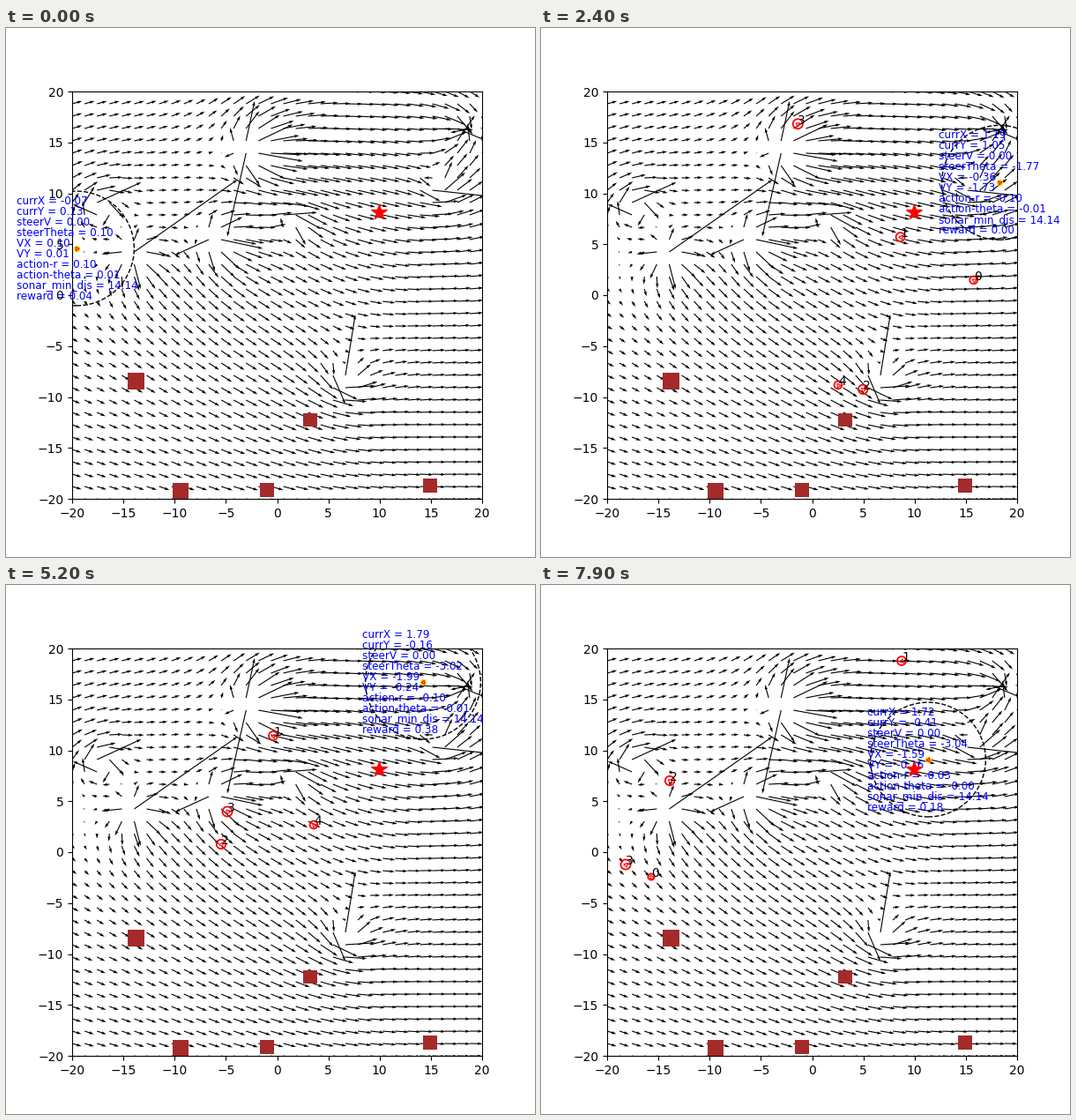
Recreate the animation shown at these times as a matplotlib script. Size 600 px wide and 600 px high, loop 8 s.

```python
import numpy as np
import matplotlib.pyplot as plt
from matplotlib.animation import FuncAnimation
from matplotlib.patches import Circle, Rectangle

FRAMES = 80
GOAL = 9.95 + 8.17j
STREAM = 1.04

# Positions are complex numbers x + yj.
# Eddies: centre, strength (real part pushes outward, imaginary part turns left)
EDDIES = [
    (-2.893 + 14.286j, 3.35),
    (-6.19 + 5.573j, 2.23),
    (-14.082 + 4.132j, 2.23),
    (17.9 + 16.2j, -2.7),
    (-17.36 + 8.615j, -2.2j),
    (0.95 + 7.14j, -1.42j),
    (15.25 + 10.76j, 1.86j),
    (6.323 - 7.895j, 2.16j),
]

# Waypoints in stage pixels
ROBOT_STOPS = (0, 9, 18, 25, 32, 36, 40, 46, 52, 67, 79)
ROBOT = [80+250j, 153+215j, 376+183j, 535+172j, 551+126j, 543+118j,
         487+113j, 508+96j, 473+110j, 434+147j, 439+198j]

# Boats: label, radius, waypoints, index of the first stop
BOAT_STOPS = (18, 32, 40, 52, 67, 79)
BOATS = [
    ("0", 0.38, [488+228j, 496+363j, 507+440j], 0),
    ("0", 0.31, [65+333j, 125+331j], 4),
    ("1", 0.43, [467+239j, 328+238j, 247+251j, 303+171j, 426+81j, 409+86j], 0),
    ("2", 0.45, [400+447j, 331+357j, 336+293j, 244+294j, 218+288j, 146+222j], 0),
    ("3", 0.48, [260+118j, 317+113j, 291+171j, 251+257j, 187+342j, 96+317j], 0),
    ("4", 0.38, [366+447j, 298+349j, 258+294j, 349+272j, 475+266j], 0),
]


def to_axis(p):
    """Stage pixels to axis units."""
    return complex((p.real - 75) / 11.625 - 20, 20 - (p.imag - 72) / 11.55)


def xy(z):
    return z.real, z.imag


def inside(z):
    return abs(z.real) <= 20 and abs(z.imag) <= 20


def current(z):
    w = STREAM + 0 * z
    for centre, strength in EDDIES:
        d = z - centre
        w = w + strength * d / abs(d) ** 2
    return w


def glide(stops, points, t):
    """Smooth curve through the points, straight beyond both ends."""
    T, P = np.array(stops, float), np.array(points)
    M = np.gradient(P, T)
    if t <= T[0]:
        return P[0] + M[0] * (t - T[0])
    if t >= T[-1]:
        return P[-1] + M[-1] * (t - T[-1])
    i = np.searchsorted(T, t, "right") - 1
    h = T[i + 1] - T[i]
    s = (t - T[i]) / h
    start = (1 - s) ** 2 * ((1 + 2 * s) * P[i] + s * h * M[i])
    return start + s * s * ((3 - 2 * s) * P[i + 1] + (s - 1) * h * M[i + 1])


def readout(z, step):
    """Steering angle and the text lines for a robot at z."""
    turn = 1 - np.exp(-max(step - 18, 0) / 6.6)
    theta = 0.1 - 3.14 * turn
    speed = np.interp(step, (0, 18, 40, 52, 67, 79), (0.1, 1.8, 1.69, 2, 2, 1.6))
    thrust = np.interp(step, (0, 18, 55, 67, 79), (0.1, -0.1, -0.1, 0, -0.03))
    flow = current(z)
    v = speed * np.exp(1j * theta)
    to_goal = (GOAL - z) / abs(GOAL - z)
    reward = max(0, 0.85 * ((flow + v) * to_goal.conjugate()).real)
    values = {
        "currX": flow.real, "currY": flow.imag,
        "steerV": 0, "steerTheta": theta,
        "VX": v.real, "VY": v.imag,
        "action-r": thrust, "action-theta": thrust / 10,
        "sonar_min_dis": 200 ** 0.5, "reward": reward,
    }
    return theta, [f"{key} = {val:.2f}" for key, val in values.items()]


fig, ax = plt.subplots(figsize=(6, 6), dpi=100)
ax.set(xlim=(-20, 20), ylim=(-20, 20))
ax.set_autoscale_on(False)

side = np.linspace(-20, 20, 34)
grid = side + 1j * side[:, None]
flow = current(grid)
ax.quiver(grid.real, grid.imag, flow.real, flow.imag,
          angles="xy", scale_units="xy", scale=1)

for centre, size in [(147.5+400.5j, 1.6), (345+444.5j, 1.33), (198+525j, 1.55),
                     (296+524j, 1.33), (481+519j, 1.4)]:
    corner = to_axis(centre) - size / 2 * (1 + 1j)
    ax.add_patch(Rectangle(xy(corner), size, size, color="brown", lw=0, zorder=2))
ax.plot(*xy(GOAL), "*", color="red", ms=13, zorder=4)


def ring(radius, **style):
    return ax.add_patch(Circle((0, 0), radius, fill=False, zorder=2, **style))


def pointer(size):
    return ax.plot([], [], color="red", ms=size, mew=0.8, fillstyle="none", zorder=3.1)[0]


def aim(marker, z, angle):
    marker.set_data([z.real], [z.imag])
    marker.set_marker((3, 0, np.degrees(angle) - 90))


sonar = ring(5.62, ls="--", lw=1)
body, = ax.plot([], [], "o", color="gold", ms=5.2, mew=0, zorder=3)
nose = pointer(3.5)
rows = [ax.text(0, 0, "", color="blue", fontsize=8.64) for _ in range(10)]
boats = [(ring(radius, ec="red", lw=1.3), pointer(4), ax.text(0, 0, label))
         for label, radius, *_ in BOATS]


def draw_robot(step):
    p = glide(ROBOT_STOPS, ROBOT, step)
    z = to_axis(p)
    theta, texts = readout(z, step)
    sonar.center = xy(z)
    body.set_data([z.real], [z.imag])
    aim(nose, z, theta)
    for i, (row, text) in enumerate(zip(rows, texts)):
        row.set_position(xy(to_axis(p - 68.5 + 1j * (12 * i - 50.5))))
        row.set_text(text)
        row.set_visible(inside(z))


def draw_boat(parts, points, first, step):
    stops = BOAT_STOPS[first:first + len(points)]
    z, ahead = (to_axis(glide(stops, points, t)) for t in (step, step + 0.1))
    for part in parts:
        part.set_visible(step > 0 and inside(z))
    hull, tip, name = parts
    hull.center = xy(z)
    aim(tip, z, np.angle(ahead - z))
    name.set_position(xy(z))


def draw(step):
    draw_robot(step)
    for parts, (_, _, points, first) in zip(boats, BOATS):
        draw_boat(parts, points, first, step)
    return []


anim = FuncAnimation(fig, draw, frames=FRAMES, interval=100, repeat=True,
                     repeat_delay=0, blit=False)
plt.show()
```
